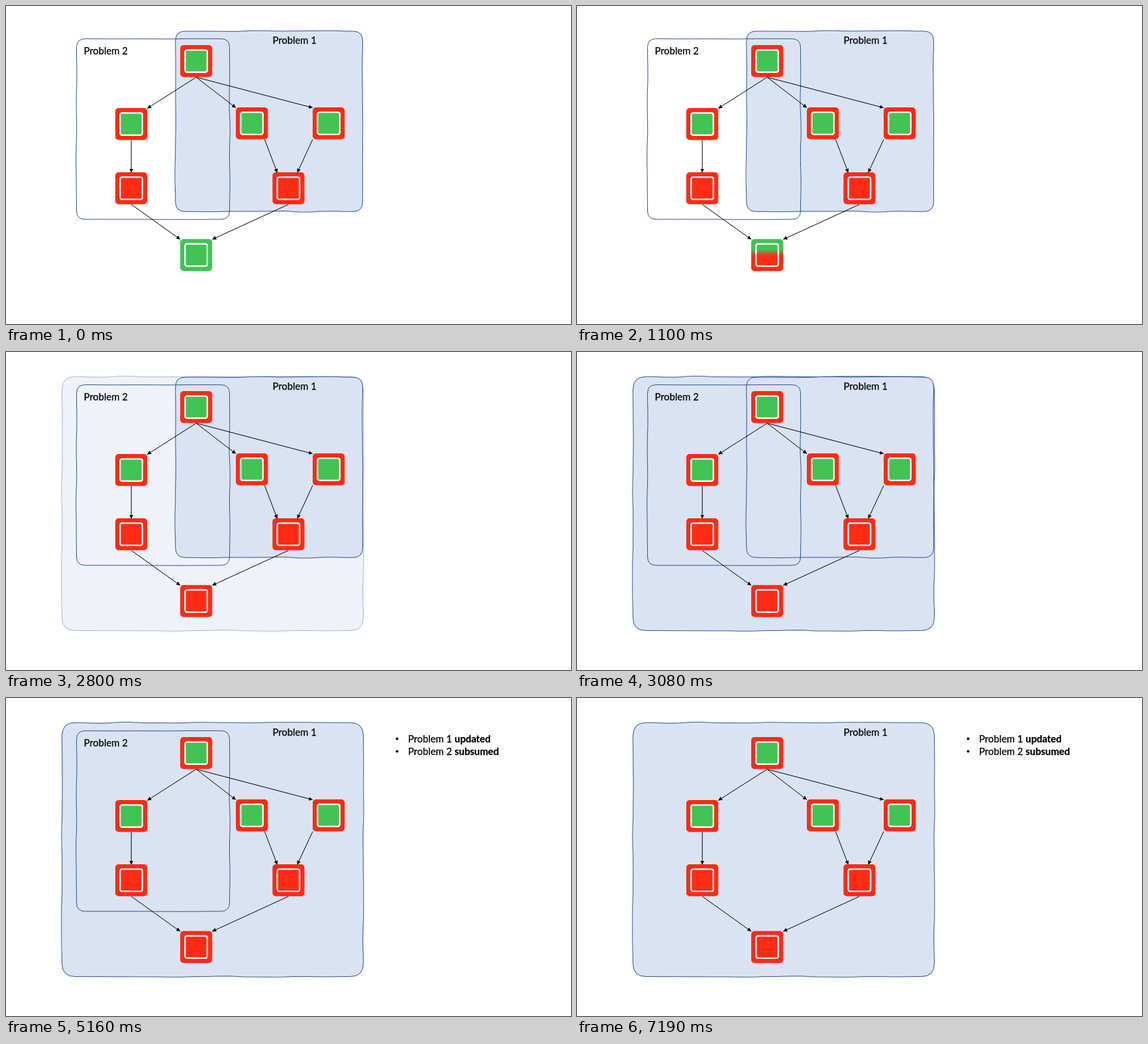
Animation of 853 by 480 pixels, one loop 8 s. Source, as an HTML page:

```html
<!DOCTYPE html>
<html lang="en">
<head>
<meta charset="utf-8">
<title>Problem merging</title>
<style>
  html, body { margin: 0; width: 100%; height: 100%; overflow: hidden; background: #fff; }
  svg { display: block; width: 100%; height: 100%; }
  text { font: 14.8px Lato, Carlito, sans-serif; stroke: #000; stroke-width: .25; }
  .bold { font-weight: 700; }
  .sketch { fill: none; stroke: #2f528f; stroke-width: 1; }
  .area { fill: #dae3f3; }
  .arrow { stroke: #000; stroke-width: 1; marker-end: url(#head); }
</style>
</head>
<body>
<svg viewBox="0 0 853 480">
  <defs>
    <marker id="head" viewBox="0 0 6 6" refX="6" refY="3" markerWidth="6" markerHeight="6" orient="auto">
      <path d="M0 0L6 3L0 6Z"/>
    </marker>
    <linearGradient id="edge" gradientUnits="userSpaceOnUse" x1="0" y1="-5" x2="0" y2="5">
      <stop offset="0" stop-color="#000"/>
      <stop offset="1" stop-color="#fff"/>
    </linearGradient>
    <mask id="wipe" maskUnits="userSpaceOnUse" x="255" y="340" width="64" height="70">
      <rect x="255" y="340" width="64" height="70" fill="url(#edge)"/>
    </mask>
  </defs>
  <g id="merged"></g>
  <g id="first"></g>
  <g id="second"><text x="117.5" y="73">Problem 2</text></g>
  <text x="402.5" y="57">Problem 1</text>
  <g id="arrows"></g>
  <g id="nodes"></g>
  <g id="calm"></g>
  <g id="alarm" mask="url(#wipe)"></g>
  <g id="note1">
    <circle cx="590.5" cy="61.5" r="2"/>
    <text x="607" y="67">Problem 1</text><text class="bold" x="677.3" y="67">updated</text>
  </g>
  <g id="note2">
    <circle cx="590.5" cy="80.5" r="2"/>
    <text x="607" y="86">Problem 2</text><text class="bold" x="677.3" y="86">subsumed</text>
  </g>
</svg>
<script>
const RED = '#ff2b14', GREEN = '#41c454', NODE = 48.3;
const $ = id => document.getElementById(id);

function add(parent, tag, attrs) {
  const el = document.createElementNS('http://www.w3.org/2000/svg', tag);
  for (const key in attrs) el.setAttribute(key, attrs[key]);
  $(parent).appendChild(el);
}

let seed = 7;
const random = () => (seed = seed * 16807 % 2147483647) / 2147483647;

// Rounded box, clockwise from the top left, whose sides waver like a hand-drawn line.
function sketchPath(x, y, w, h, r) {
  const corners = [[x, y, 1, 0, w], [x + w, y, 0, 1, h], [x + w, y + h, -1, 0, w], [x, y + h, 0, -1, h]];
  let d = '', start;
  corners.forEach(([cx, cy, dx, dy, length], side) => {
    const at = (along, out) => `${cx + dx * along + dy * out} ${cy + dy * along - dx * out} `;
    const count = Math.round((length - 2 * r) / 38), step = (length - 2 * r) / count;
    const first = at(r, 0);
    d += side ? `Q${cx} ${cy} ${first}` : 'M' + (start = first);
    for (let i = 1, last = 0; i <= count; i++) {
      const along = r + i * step, mid = along - step / 2;
      const out = i < count ? (random() - .5) * 1.8 : 0;
      d += `C${at(mid, last)}${at(mid, out)}${at(along, out)}`;
      last = out;
    }
  });
  return `${d}Q${x} ${y} ${start}Z`;
}

function sketchBox(parent, x, y, width, height, r, filled) {
  if (filled) add(parent, 'rect', { class: 'area', x, y, width, height, rx: r * .8 });
  add(parent, 'path', { class: 'sketch', d: sketchPath(x, y, width, height, r) });
}

function node(parent, [x, y], outer, inner) {
  add(parent, 'rect', { x, y, width: NODE, height: NODE, rx: 5, fill: outer });
  add(parent, 'rect', {
    x: x + 7.3, y: y + 7.3, width: 33.6, height: 33.6, rx: 3, fill: inner, stroke: '#fff', 'stroke-width': 2.3
  });
}

// Joins the bottom of one node to the top of another; slots run from -1 (left corner) to 1 (right corner).
function arrow(from, fromSlot, to, toSlot) {
  const slotX = ([x], slot) => x + NODE / 2 * (1 + slot);
  add('arrows', 'line', {
    class: 'arrow', x1: slotX(from, fromSlot), y1: from[1] + 48.5, x2: slotX(to, toSlot), y2: to[1] + .6
  });
}

sketchBox('merged', 84.5, 37.2, 455, 383.3, 20, true);
sketchBox('first', 255.8, 38, 282.7, 272.3, 15, true);
sketchBox('second', 106.5, 49.5, 231, 272.5, 13, false);

const root = [263, 59], left = [165, 154], middle = [347, 153], right = [463, 153];
const leftEnd = [165, 251], rightEnd = [402.3, 251], sink = [263, 351.7];

arrow(root, 0, left, 1);
arrow(root, 0, middle, -1);
arrow(root, 0, right, -1);
arrow(left, 0, leftEnd, 0);
arrow(middle, .8, rightEnd, -.7);
arrow(right, -1, rightEnd, .55);
arrow(leftEnd, 0, sink, -1);
arrow(rightEnd, 0, sink, 1);

for (const place of [root, left, middle, right]) node('nodes', place, RED, GREEN);
for (const place of [leftEnd, rightEnd]) node('nodes', place, RED, RED);
node('calm', sink, GREEN, GREEN);
node('alarm', sink, RED, RED);

// Number of 70 ms ticks begun since a moment, limited to count.
const ticks = (t, from, count) => Math.max(0, Math.min(count, Math.floor((t - from) / 70) + 1));
const show = (id, visible) => $(id).setAttribute('visibility', visible ? 'visible' : 'hidden');

function draw(now) {
  const t = now % 8000, wiped = ticks(t, 610, 15);
  show('calm', wiped < 15);
  show('alarm', wiped > 0);
  $('edge').setAttribute('gradientTransform', `translate(0 ${404 - 4 * wiped})`);
  $('merged').setAttribute('opacity', ticks(t, 2660, 7) / 7);
  $('second').setAttribute('opacity', 1 - ticks(t, 6720, 7) / 7);
  show('first', t < 3690);
  show('note1', t >= 4160);
  show('note2', t >= 5160);
}

const begin = performance.now();
(function loop() {
  draw(performance.now() - begin);
  requestAnimationFrame(loop);
})();
</script>
</body>
</html>
```
